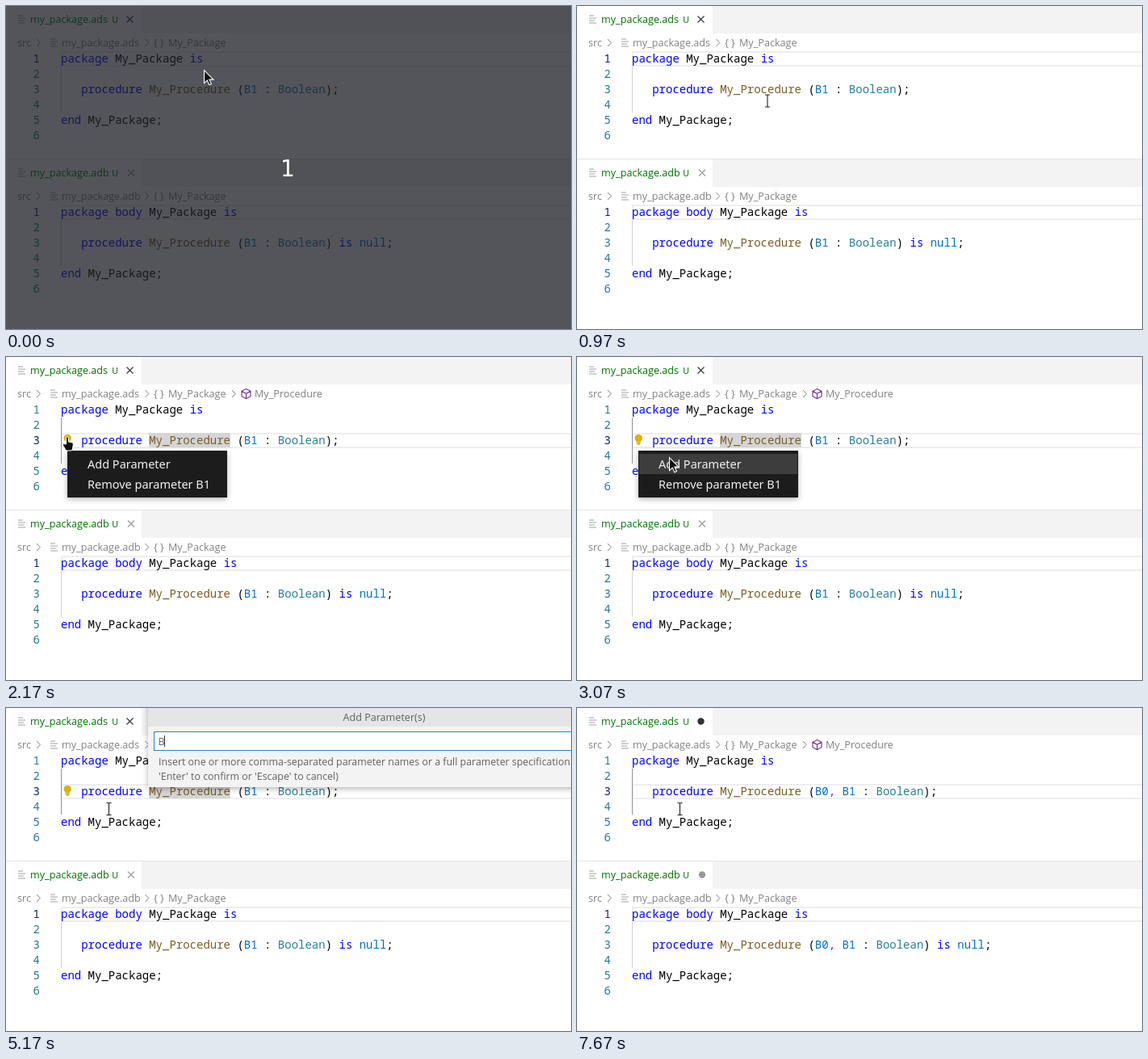
Write an HTML page that moves like this. It is 700 by 400 pixels and loops after 8000 ms.

```html
<!DOCTYPE html>
<html lang="en">
<head>
<meta charset="utf-8">
<title>Add a parameter</title>
<style>
  html, body { margin: 0; width: 100%; height: 100%; overflow: hidden; background: #fff; }
  svg { display: block; width: 700px; height: 400px; }
  text { white-space: pre; font: 12.6px "Open Sans", "Noto Sans", sans-serif; fill: #616161; }
  .code, .num { font: 14px "Noto Sans Mono", "DejaVu Sans Mono", monospace; fill: #000; }
  .num { text-anchor: end; fill: #237893; }
  .num.on { fill: #0b216f; }
  .key { fill: #00f; }
  .fn { fill: #795e26; }
  .type { fill: #267f99; }
  .arg { fill: #0070c1; }
  .sep { fill: #af00db; }
  .fresh .added { fill: #000; }
  .crumb { fill: #818181; }
  .tab { fill: #007100; }
  .badge { font-size: 11px; font-weight: 600; fill: #3c8c3c; }
  .item { font: 14.5px "Noto Sans", "Open Sans", sans-serif; fill: #f2f2f2; }
  .title { text-anchor: middle; }
  .hint { font-size: 12.4px; }
  .count { font: 28px "DejaVu Sans", sans-serif; fill: #fff; text-anchor: middle; }
  .line { fill: none; stroke: #818181; }
</style>
</head>
<body>
<svg id="stage" viewBox="0 0 700 400" xmlns="http://www.w3.org/2000/svg">
  <defs>
    <filter id="shadow" x="-10%" y="-20%" width="120%" height="150%">
      <feDropShadow dx="0" dy="2" stdDeviation="3.5" flood-opacity=".3"/>
    </filter>
  </defs>
  <g id="editors"></g>
  <g id="bulb">
    <path d="M73.5 104.3a4.7 4.7 0 1 1 5.4 0v1.2h-5.4z" fill="#ddb100"/>
    <path d="M73.8 106.6h4.8M74.6 108.3h3.2" stroke="#c29a00" stroke-width="1.1"/>
  </g>
  <rect id="caret" x="235" y="94" width="2" height="19"/>
  <g id="menu">
    <rect x="76" y="116" width="198" height="58" fill="#1c1c1c" filter="url(#shadow)"/>
    <rect id="hover" x="77" y="120" width="196" height="25" fill="#3d3d3d"/>
    <text class="item" x="101" y="138">Add Parameter</text>
    <text class="item" x="101" y="163">Remove parameter B1</text>
  </g>
  <g id="panel">
    <rect x="176" y="-10" width="584" height="108" fill="#f3f3f3" filter="url(#shadow)"/>
    <rect x="176" width="524" height="23" fill="#e5e5e5"/>
    <text class="title" x="468.5" y="16">Add Parameter(s)</text>
    <rect x="183.5" y="29.5" width="570" height="23" fill="#fff" stroke="#2b83c0"/>
    <text id="entry" x="188.5" y="46"></text>
    <rect id="entryCaret" y="34" width="1" height="14" fill="#333"/>
    <text class="hint" x="189" y="71">Insert one or more comma-separated parameter names or a full parameter specification</text>
    <text class="hint" x="189" y="89">'Enter' to confirm or 'Escape' to cancel)</text>
  </g>
  <g id="veil">
    <rect width="700" height="400" fill="#1d1f25" fill-opacity=".757"/>
    <text class="count" x="349" y="211">1</text>
  </g>
  <g id="arrow">
    <path d="M.5.5v16l3.8-3.4 2.5 5.6 2.6-1.2-2.5-5.4h5z" fill="#111" stroke="#fff" stroke-width="1.1"/>
  </g>
  <g id="beam" fill="none">
    <path d="M-3-7.5h2q1 0 1 1v13q0 1-1 1h-2M3-7.5H1q-1 0-1 1M0 6.5q0 1 1 1h2" stroke="#fff" stroke-width="2.4"/>
    <path d="M-3-7.5h2q1 0 1 1v13q0 1-1 1h-2M3-7.5H1q-1 0-1 1M0 6.5q0 1 1 1h2" stroke="#222" stroke-width="1.1"/>
  </g>
  <g id="hand">
    <path d="M-1.5 9V1.3q0-1.5 1.5-1.5t1.5 1.5V6l4.5 1q1.6.5 1.4 2l-1 6q-.4 2-2.4 2H0q-1.5 0-2.4-1.4l-3-5.2q-.5-1.6 1-1.8z" fill="#111" stroke="#fff"/>
  </g>
</svg>
<script>
const LOOP = 8000;
const $ = id => document.getElementById(id);

const kinds = [
  ["key", /^(package|body|is|procedure|end)$/],
  ["fn", /^My_Procedure$/],
  ["type", /^Boolean$/],
  ["arg added", /^B0$/],
  ["arg", /^(B1|null)$/],
  ["sep", /^,$/]
];

function paint(src) {
  return src.replace(/\w+|,/g, word => {
    const kind = kinds.find(k => k[1].test(word));
    return kind ? `<tspan class="${kind[0]}">${word}</tspan>` : word;
  });
}

const text = (cls, x, y, body, id = "") => `<text id="${id}" class="${cls}" x="${x}" y="${y}">${body}</text>`;
const chevron = x => `<path class="line" d="M${x - 2} 41l4.3 4.5-4.3 4.5"/>`;
const fileIcon = (x, y) =>
  `<path class="line" stroke-opacity=".75" d="M${x} ${y - 4.5}h6M${x} ${y - 1.5}h9M${x} ${y + 1.5}h7M${x} ${y + 4.5}h9"/>`;

function editor(id, top, file, head, tail, closeX, ink) {
  const sig = args => paint(`   procedure My_Procedure (${args} : Boolean)${tail};`);
  const nums = [1, 2, 3, 4, 5, 6].map(n =>
    text("num", 42, 51 + 19 * n, n, id + "Num" + n)).join("");
  const row = (n, src) => text("code", 68, 51 + 19 * n, src);
  return `<g id="${id}" transform="translate(0 ${top})">
    <rect width="700" height="34" fill="#f3f3f3"/>
    <rect width="168" height="34" fill="#fff"/>
    ${fileIcon(15, 16.5)}
    ${text("tab", 30, 21, file)}${text("badge", 131, 20.5, "U")}
    <path id="${id}Close" d="M${closeX - 4} 12.5l8 8m0-8l-8 8" stroke="${ink}" stroke-width="1.1"/>
    <circle id="${id}Dirty" cx="${closeX}" cy="16.5" r="4.2" fill="${ink}"/>
    ${text("crumb", 14, 50, "src")}${chevron(40)}${fileIcon(55, 45.5)}
    ${text("crumb", 69, 50, file)}${chevron(174.5)}
    ${text("crumb", 183, 49.5, "{ }")}${text("crumb", 201, 50, "My_Package")}
    <g id="${id}Symbol">${chevron(282)}
      <path d="M297.5 39.5l5.5 2.8v6.4l-5.5 3-5.5-3v-6.4zM292 42.3l5.5 3 5.5-3M297.5 45.3v6.4" fill="none" stroke="#652d90" stroke-width="1.1"/>
      ${text("crumb", 308, 50, "My_Procedure")}</g>
    <rect id="${id}Row" x="69" y="57" width="700" height="17" fill="none" stroke="#eee" stroke-width="2"/>
    <rect id="${id}Word" x="177" y="94" width="101" height="18" fill="#d5d5d5"/>
    <path id="${id}Guide" d="M68.5 75v57" stroke="#d3d3d3"/>
    ${nums}
    ${row(1, paint(head + " My_Package is"))}
    <g id="${id}Old">${row(3, sig("B1"))}</g>
    <g id="${id}New">${row(3, sig("B0, B1"))}</g>
    ${row(5, paint("end My_Package;"))}
  </g>`;
}

$("editors").innerHTML =
  editor("spec", 0, "my_package.ads", "package", "", 153.5, "#333") +
  editor("body", 190, "my_package.adb", "package body", " is null", 155, "#999") +
  '<path d="M0 189.5h700" stroke="#e4e4e4"/>';
$("bodyNum1").classList.add("on");

// Pointer path: time, x, y, shape from that time on
const path = [
  [0, 245, 79, "arrow"], [30, 245.5, 80, "beam"], [299, 245.5, 80, "beam"],
  [300, 245.5, 77, "beam"], [440, 245.5, 77, "beam"],
  [680, 238, 233, "beam"], [740, 236, 233, "beam"], [1000, 236, 103, "beam"],
  [1500, 236, 103, "beam"], [1730, 118, 103, "beam"], [1930, 78, 102, "hand"],
  [2050, 76, 99, "hand"], [2640, 76, 99, "hand"], [2720, 80, 104, "arrow"],
  [2900, 102, 119, "arrow"], [3070, 114, 124, "arrow"], [3170, 116, 124, "arrow"],
  [3329, 116, 124, "arrow"], [3330, 118, 125, "arrow"], [3530, 118, 126, "beam"],
  [3770, 118, 126, "beam"], [3900, 127.5, 125, "beam"], [LOOP, 127.5, 125, "beam"]
];

function pointer(t) {
  const i = path.findIndex(p => p[0] > t);
  const [t0, x0, y0, shape] = path[i - 1], [t1, x1, y1] = path[i];
  const k = (t - t0) / (t1 - t0);
  return { x: x0 + (x1 - x0) * k, y: y0 + (y1 - y0) * k, shape };
}

const show = (id, on) => $(id).style.display = on ? "" : "none";

function draw(t) {
  const within = (a, b = LOOP) => t >= a && t < b;
  const clicked = t >= 1030, closed = t >= 7170;

  show("veil", t < 30);
  show("menu", within(2170, 3530));
  show("hover", t >= 2900);
  show("panel", within(3570, 7170));
  show("bulb", within(1300, 7230));
  show("caret", within(1030, 1530) || within(2030, 2170) || within(7170, 7670));

  show("specSymbol", t >= 1170);
  show("specWord", within(1230, 7200));
  show("bodySymbol", false);
  show("bodyWord", false);
  $("specRow").setAttribute("y", clicked ? 95 : 57);
  $("specGuide").setAttribute("stroke", clicked ? "#939393" : "#d3d3d3");
  $("specNum1").classList.toggle("on", !clicked);
  $("specNum3").classList.toggle("on", clicked);

  for (const [id, edited, tinted] of [["spec", 7200, 7500], ["body", 7230, 7530]]) {
    const done = t >= edited;
    show(id + "Old", !done);
    show(id + "New", done);
    show(id + "Close", !done);
    show(id + "Dirty", done);
    $(id).classList.toggle("fresh", t < tinted);
  }

  const typed = (t >= 5170) + (t >= 6270);
  $("entry").textContent = "B0".slice(0, typed);
  $("entryCaret").setAttribute("x", [188, 196, 203][typed]);

  const p = pointer(t);
  for (const shape of ["arrow", "beam", "hand"]) show(shape, shape === p.shape);
  $(p.shape).setAttribute("transform", `translate(${p.x} ${p.y})`);
}

const start = performance.now();
function tick() {
  draw(Math.max(0, performance.now() - start) % LOOP);
  requestAnimationFrame(tick);
}
draw(0);
requestAnimationFrame(tick);
</script>
</body>
</html>
```
